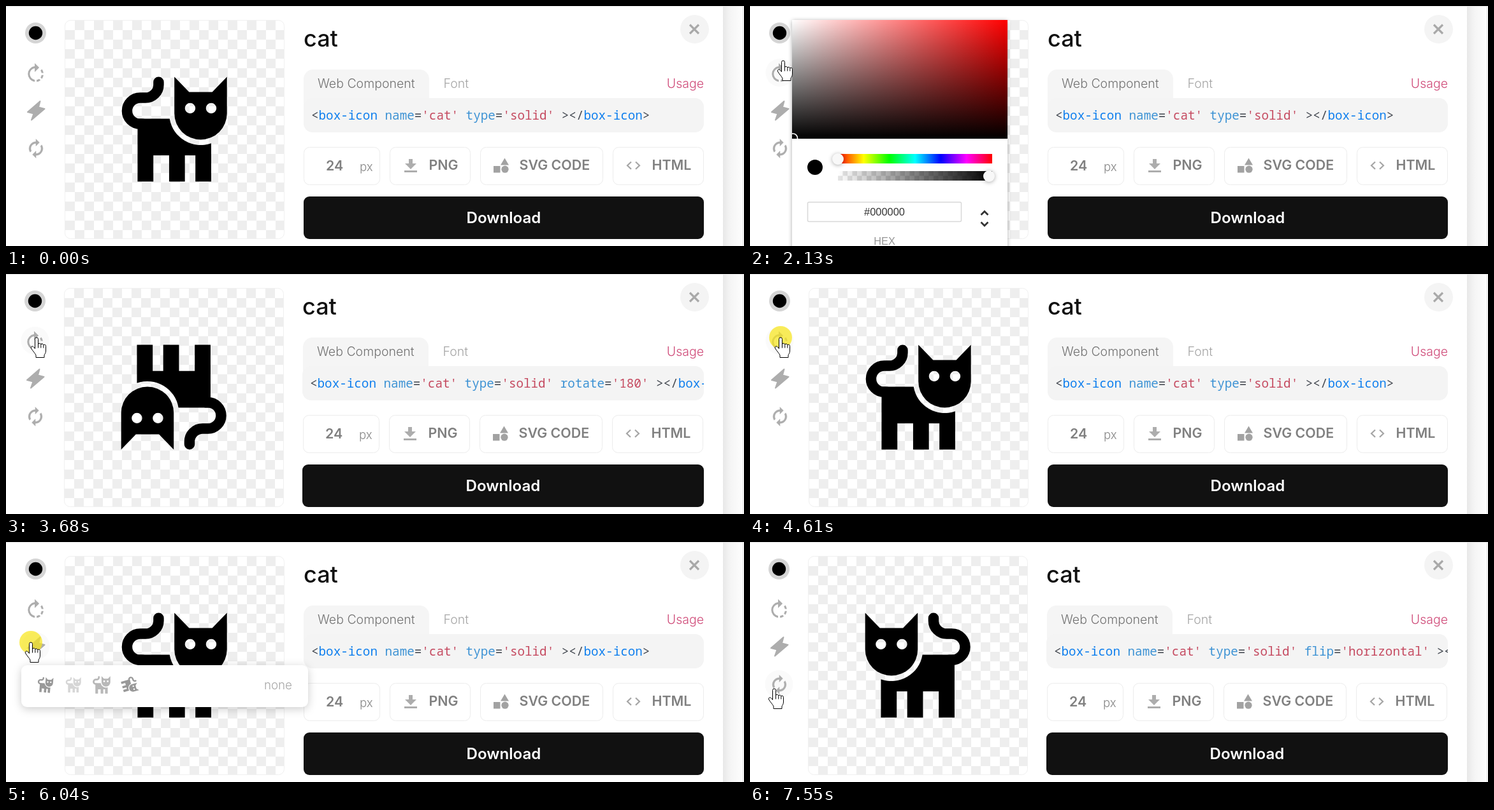
Animation, 1158 px wide and 378 px high, one loop 8 s. Source, as an HTML page:

```html
<!DOCTYPE html>
<html lang="en">
<head>
<meta charset="utf-8">
<title>Icon panel</title>
<style>
  html, body { margin: 0; height: 100%; overflow: hidden; background: #fff; }
  svg { display: block; width: 100vw; height: 100vh; font-family: Inter, sans-serif; }
  text { white-space: pre; }
  .light { font-weight: 300; font-size: 19.5px; }
  .bold { font-weight: 600; font-size: 21.4px; fill: #808080; }
  .box { fill: #fff; stroke: #ececec; }
  .icon { fill: #adadad; }
  .code { font: 19.25px "Noto Sans Mono", monospace; fill: #454a52; }
  .tag { fill: #0f7fee; }
  .attr { fill: #3c92d4; }
  .str { fill: #c54a60; }
  .small { font: 16.4px "Liberation Sans", Arial, sans-serif; text-anchor: middle; }
  .lift { filter: drop-shadow(0 1px 3px #0005); }
  .float { filter: drop-shadow(0 3px 7px #0003); }
</style>
</head>
<body>
<svg viewBox="0 0 1158 378">
  <defs>
    <path id="cat" stroke="none" fill-rule="evenodd" d="M12 2l2.8 2.9h4.4L22 2v7a5 5 0 0 1-10 0z
      M14 8a1 1 0 0 0 2 0a1 1 0 0 0-2 0z M18 8a1 1 0 0 0 2 0a1 1 0 0 0-2 0z
      M11.1 10A6 6 0 0 0 19 14.7V22h-3v-5h-2v5h-3v-5H8v5H5V10z"/>
    <path id="tail" d="M9 3v.5A2.5 2.5 0 0 1 6.5 6h-1a2.5 2.5 0 0 0 0 5H6"
      fill="none" stroke-width="2" stroke-linecap="round"/>
    <g id="kitty" transform="translate(-12 -12)"><use href="#cat"/><use href="#tail"/></g>
    <pattern id="checks" x="93" y="23" width="30" height="30" patternUnits="userSpaceOnUse">
      <path d="M15 0h15v15H15zM0 15h15v15H0z" fill="#eee"/>
    </pattern>
    <pattern id="tinyChecks" x="138" y="260" width="15" height="15" patternUnits="userSpaceOnUse">
      <path d="M7.5 0H15v7.5H7.5zM0 7.5h7.5V15H0z" fill="#e4e4e4"/>
    </pattern>
    <linearGradient id="edge"><stop stop-color="#e8e8e8"/><stop offset=".4" stop-color="#f5f5f5"/><stop offset="1" stop-color="#fdfdfd"/></linearGradient>
    <linearGradient id="tint"><stop stop-color="#fff"/><stop offset="1" stop-color="#f00"/></linearGradient>
    <linearGradient id="shade" x2="0" y2="1"><stop stop-color="#000" stop-opacity="0"/><stop offset="1"/></linearGradient>
    <linearGradient id="alpha"><stop stop-color="#000" stop-opacity="0"/><stop offset="1"/></linearGradient>
    <linearGradient id="hue"></linearGradient>
    <clipPath id="codeClip"><path d="M460 145h635v54H460z"/></clipPath>
    <clipPath id="tintClip"><path d="M66 22h338v187H66z"/></clipPath>
  </defs>

  <rect width="1158" height="378" fill="#fff"/>
  <rect x="1125" width="30" height="378" fill="url(#edge)"/>
  <rect x="1155" width="3" height="378" fill="#fdfdfd"/>
  <path d="M1156.5 0V378M0 .5H1158" stroke="#e3e3e3"/>

  <g data-shift="1">
    <circle id="glow" cx="46.5" r="22"/>
    <circle cx="46.5" cy="42.5" r="16.5" fill="#d5d5d5"/>
    <circle cx="46.5" cy="42.5" r="10.7"/>
    <path class="icon" transform="translate(28 88.5) scale(1.55)" d="M15.55 5.55L11 1v3.07a8 8 0 0 0 0 15.86v-2.02a6 6 0 0 1 0-11.82V10z
      M19.93 11a8 8 0 0 0-1.62-3.89l-1.42 1.42a6 6 0 0 1 1.02 2.47z
      M13 17.9v2.02a8 8 0 0 0 3.9-1.61l-1.44-1.44a6 6 0 0 1-2.46 1.03z
      M16.89 15.48l1.42 1.41a8 8 0 0 0 1.62-3.89h-2.02a6 6 0 0 1-1.02 2.48z"/>
    <path class="icon" stroke="#adadad" stroke-width="2" stroke-linejoin="round" d="M53.5 150L34 167l9.5 2.5L40 179.500 60.500 162 51 159.500z"/>
    <path class="icon" stroke="#adadad" stroke-width=".4" transform="translate(30.8 208.3) scale(1.35)" d="M12 6v3l4-4-4-4v3a8 8 0 0 0-6.76 12.26L6.7 14.8A6 6 0 0 1 12 6z
      M18.76 7.74L17.3 9.2A6 6 0 0 1 12 18v-3l-4 4 4 4v-3a8 8 0 0 0 6.76-12.26z"/>
    <rect x="92.5" y="22.5" width="344" height="344" rx="9" fill="url(#checks)" stroke="#f0f0f0"/>
    <g id="bigCat" stroke="#000"><use href="#kitty"/></g>
    <path d="M467 165V115a15 15 0 0 1 15-15H649a15 15 0 0 1 15 15V165z" fill="#f5f5f5"/>
    <text class="light" x="489" y="129" fill="#717171">Web Component</text>
    <text class="light" x="686.5" y="129" fill="#a4a4a4">Font</text>
  </g>
  <text class="light" x="1095" y="129" text-anchor="end" fill="#cf4a78">Usage</text>
  <text data-shift="2" x="467" y="64" font-size="36" font-weight="500" fill="#111">cat</text>
  <circle cx="1080.5" cy="36.5" r="22.5" fill="#f4f4f4"/>
  <path d="M1073 29.5l14 14m0-14l-14 14" stroke="#a9a9a9" stroke-width="3.2"/>

  <rect data-wide y="145" height="54" rx="14" fill="#f4f4f4"/>
  <g clip-path="url(#codeClip)"><text id="code" class="code" data-shift="2" x="479" y="179"></text></g>

  <g data-shift="1">
    <rect class="box" x="467.5" y="222.5" width="119" height="59" rx="9"/>
    <rect class="box" x="602.5" y="222.5" width="126" height="59" rx="9"/>
    <rect class="box" x="744.5" y="222.5" width="192" height="59" rx="9"/>
    <rect class="box" x="952.5" y="222.5" width="142" height="59" rx="9"/>
    <text class="bold" x="502" y="259">24</text>
    <text class="light" x="555" y="260" fill="#858585" style="font-size:18.6px">px</text>
    <text class="bold" x="663.5" y="258">PNG</text>
    <text class="bold" x="805.5" y="258">SVG CODE</text>
    <text class="bold" x="1013.5" y="258">HTML</text>
    <path class="icon" d="M632 241h6v7h6l-9 9-9-9h6zM625 259h20v3H625z"/>
    <path fill="#a2a2a2" d="M765 252h10.5v10.5H765zM782.5 239.5l6.5 11H776z"/>
    <circle cx="783" cy="257.2" r="5.6" fill="#a2a2a2"/>
    <path d="M981 245.5l-6 5.7 6 5.7M988 245.5l6 5.7-6 5.7" fill="none" stroke="#a6a6a6" stroke-width="2.2"/>
  </g>
  <rect data-wide y="300" height="67" rx="9" fill="#111"/>
  <text data-shift="1" x="781" y="342" text-anchor="middle" font-size="24.1" font-weight="600" fill="#fff">Download</text>

  <g id="picker">
    <rect class="lift" x="66" y="22" width="338" height="370" rx="3" fill="#fff"/>
    <g clip-path="url(#tintClip)">
      <rect x="66" y="22" width="338" height="187" fill="url(#tint)"/>
      <rect x="66" y="22" width="338" height="187" fill="url(#shade)"/>
      <circle cx="67.5" cy="208" r="7" fill="none" stroke="#fff" stroke-width="1.7"/>
    </g>
    <circle cx="102" cy="254" r="12"/>
    <rect x="138" y="233" width="242" height="15" fill="url(#hue)"/>
    <rect x="138" y="260" width="242" height="15" fill="url(#tinyChecks)"/>
    <rect x="138" y="260" width="242" height="15" fill="url(#alpha)"/>
    <g class="lift" fill="#f8f8f8"><circle cx="138" cy="241" r="9"/><circle cx="375" cy="268" r="9"/></g>
    <rect x="90.5" y="309" width="241" height="30.5" rx="2" fill="#fff" stroke="#d8d8d8" stroke-width="1.5"/>
    <text class="small" x="211" y="330" fill="#333">#000000</text>
    <text class="small" x="211" y="376" fill="#969696">HEX</text>
    <path d="M362.5 329l5.5-5.5 5.5 5.5M362.5 340.5l5.5 5.5 5.5-5.5" fill="none" stroke="#333" stroke-width="2.8"/>
  </g>

  <g id="menu">
    <rect class="float" x="24" y="194" width="450" height="66" rx="9" fill="#fff"/>
    <g id="samples" fill="#999" stroke="#999"></g>
    <text class="light" x="449" y="232" text-anchor="end" fill="#a6a6a6" style="font-size:18.8px">none</text>
  </g>

  <circle id="press" r="18" fill="#f8e71c" fill-opacity=".72"/>
  <g id="cursor" fill="#fff" stroke="#000" stroke-linejoin="round">
    <g id="hand">
      <path d="M-2.5 2.5a2.5 2.5 0 0 1 5 0V11c0-2.5 4.300-2.5 4.300.5c0-2 4-2 4 1c0-2 3.7-2 3.7 1V21c0 4-2 5-2.5 7v3.5H-1V28C-2 25-6 21.5-8.500 17c-1-3 2-4 4-2l2 2.5z"/>
      <path d="M2.5 11v5.5M6.8 12v4.5M10.8 13v3.5" fill="none"/>
    </g>
    <path id="arrow" d="M0 0V19.5L4.5 15.5 7.5 22.5 10.8 21 7.8 14.2H13.8z"/>
  </g>
</svg>
<script>
const LOOP = 8000, MENU_OPEN = 5630;
const $ = id => document.getElementById(id);
const lerp = (a, b, p) => a + (b - a) * p;
const clamp = v => Math.min(1, Math.max(0, v));
const within = (t, [from, to]) => t >= from && t < to;
const show = (el, on) => el.style.display = on ? '' : 'none';

// time, x, y of the pointer tip
const path = [
  [330, 1113, 227], [500, 940, 142], [680, 690, 90], [890, 330, 55], [1100, 92, 41],
  [1300, 66, 42], [1520, 54, 38], [1860, 54, 38], [1990, 53, 65], [2130, 52, 86],
  [2330, 48, 100], [4890, 48, 100], [5080, 44, 135], [5290, 39, 158], [6740, 39, 158],
  [6880, 14, 205], [7010, 2, 247], [7150, 6, 259], [7350, 38, 231], [LOOP, 38, 231]
];
const presses = [[2790, 2920], [3540, 3680], [4080, 4210], [4540, 4680], [5430, 6810], [7490, 7550]];
const edits = [[0], [2790, 'rotate', 90], [3610, 'rotate', 180], [4080, 'rotate', 270], [4610], [7490, 'flip', 'horizontal']];
const iconRows = [42.5, 105, 164, 224];
const tadaAngles = [0, -10, -10, 10, -10, 10, -10, 10, -10, 10, 0];

$('hue').innerHTML = [0, 60, 120, 180, 240, 300, 360]
  .map(h => `<stop offset="${h / 360}" stop-color="hsl(${h} 100% 50%)"/>`).join('');
$('samples').innerHTML = '<g><use href="#kitty"/></g>'.repeat(4);

const attribute = (name, value) => ` <tspan class="attr">${name}</tspan>=<tspan class="str">'${value}'</tspan>`;

// An extra attribute widens the code line, which nudges the layout left
function drawEdit([, name, value]) {
  const s = name ? 1 : 0;
  document.querySelectorAll('[data-shift]').forEach(el =>
    el.setAttribute('transform', `translate(${-s * el.dataset.shift} 0)`));
  document.querySelectorAll('[data-wide]').forEach(el => {
    el.setAttribute('x', 467 - 2 * s);
    el.setAttribute('width', 628 + 2 * s);
  });
  const tag = '<tspan class="tag">box-icon</tspan>';
  $('code').innerHTML = '&lt;' + tag + attribute('name', 'cat') + attribute('type', 'solid') +
    (name ? attribute(name, value) : '') + ' &gt;&lt;/' + tag + '&gt;';
  const turn = name === 'rotate' ? `rotate(${value})` : name ? 'scale(-1 1)' : '';
  $('bigCat').setAttribute('transform', `translate(264.2 194) ${turn} scale(8.25)`);
}

function drawMenu(t) {
  const open = clamp((t - MENU_OPEN) / 130) * clamp((7010 - t) / 130);
  show($('menu'), open > 0);
  if (!open) return;
  $('menu').setAttribute('opacity', open);
  const age = t - MENU_OPEN, p = age / 1500 % 1, i = Math.floor(p * 10);
  const place = (n, angle, scale, opacity) => {
    const el = $('samples').children[n];
    el.setAttribute('transform', `translate(${61.5 + 44.2 * n} 225) rotate(${angle}) scale(${1.2 * scale})`);
    el.setAttribute('opacity', opacity);
  };
  place(0, lerp(tadaAngles[i], tadaAngles[i + 1], p * 10 - i), 1, 1);
  place(1, 0, 1, clamp(Math.abs(p - .45) / .45));
  place(2, 0, lerp(1, 1.5, clamp(p / .9)), 1 - clamp(p / .9));
  place(3, age * .18, 1, 1);
}

function drawPointer(t) {
  const visible = t >= path[0][0];
  show($('cursor'), visible);
  const k = Math.max(1, path.findIndex(point => point[0] > t));
  const [a, b] = [path[k - 1], path[k]];
  const p = clamp((t - a[0]) / (b[0] - a[0]));
  const x = lerp(a[1], b[1], p), y = lerp(a[2], b[2], p);
  const overIcons = x > 25 && x < 69;
  $('cursor').setAttribute('transform', `translate(${x} ${y})`);
  show($('hand'), overIcons);
  show($('arrow'), !overIcons);

  const row = iconRows.find(cy => Math.abs(cy - y) < 22);
  show($('glow'), visible && overIcons && row);
  if (row) {
    $('glow').setAttribute('cy', row);
    $('glow').setAttribute('fill', row === iconRows[0] ? '#eee' : '#fafafa');
  }
  show($('press'), presses.some(span => within(t, span)));
  $('press').setAttribute('cx', x);
  $('press').setAttribute('cy', y);
}

let current;
function frame(now) {
  const t = now % LOOP;
  const edit = edits.filter(e => e[0] <= t).pop();
  if (edit !== current) drawEdit(current = edit);
  show($('picker'), within(t, [1650, 2790]));
  drawMenu(t);
  drawPointer(t);
  requestAnimationFrame(frame);
}
frame(0);
</script>
</body>
</html>
```
